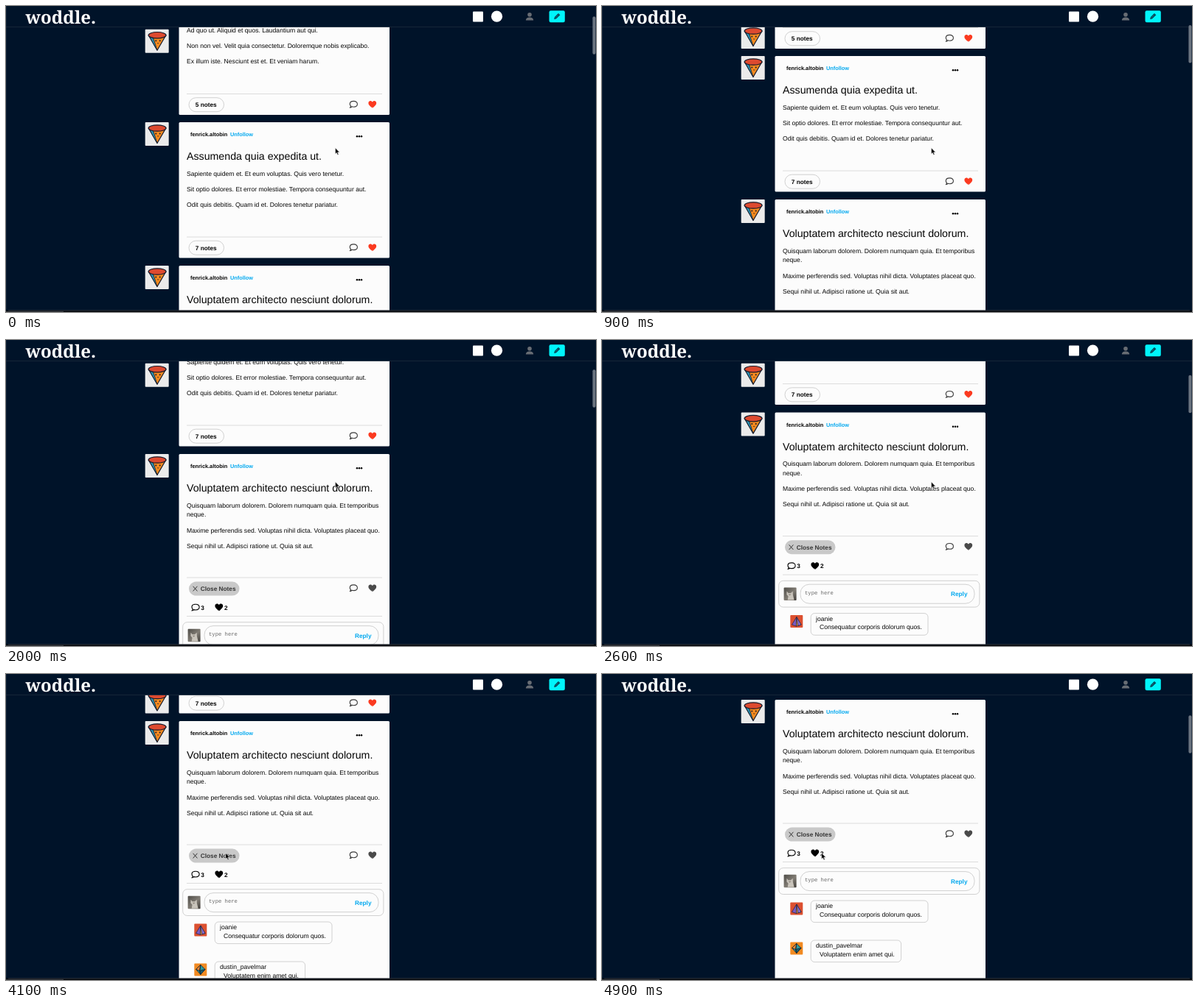
These frames come from a looping animation (800 by 416 pixels, 5 s). An HTML page:

```html
<!DOCTYPE html>
<html lang="en">
<head>
<meta charset="utf-8">
<title>Blog feed</title>
<style>
  html, body { margin: 0; width: 100%; height: 100%; overflow: hidden; background: #001329; }
  svg { display: block; width: 100vw; height: 100vh; }
  text { font-family: "Liberation Sans", Arial, sans-serif; font-size: 8.6px; fill: #050505; text-rendering: geometricPrecision; white-space: pre; }
  .logo { font: 900 24px "Noto Serif", serif; fill: #fff; }
  .title { font-size: 14.2px; }
  .user { font-size: 7.35px; font-weight: bold; }
  .pill { font-size: 8.25px; font-weight: bold; }
  .link { fill: #00a8ef; }
  .hint { font-family: "Liberation Mono", monospace; font-size: 7.2px; fill: #666; }
  .rule { stroke: #dcdcdc; stroke-width: 1; }
  .box { fill: #fcfcfc; stroke: #c6c6c6; stroke-width: .8; }
</style>
</head>
<body>
<svg id="stage" viewBox="0 0 800 416" preserveAspectRatio="none">
  <defs>
    <path id="heart" d="M0 5C-2-.0 0 5 -1 4.2C-4 1.6-5.4 .2-5.4-1.9C-5.4-3.7-4.1-4.9-2.6-4.9C-1.5-4.9-.6-4.3 0-3.4C.6-4.3 1.5-4.9 2.6-4.9C4.1-4.9 5.4-3.7 5.4-1.9C5.4 .2 4 1.6 1 4.2Z"/>
    <path id="bubble" fill="none" stroke-width="1.15" stroke-linejoin="round"
      d="M-3.5 2.5C-4.5 1.8-5-.1-5-.6C-5-2.9-2.8-4.4 .2-4.4S5.1-2.9 5.1-.5S3.2 3.4 .2 3.4C-.7 3.4-1.4 3.2-2 3C-2.8 3.8-3.9 4.3-5 4.3C-4.2 3.7-3.7 3.1-3.5 2.5Z"/>
    <g id="cone">
      <rect width="32" height="32" rx="1" fill="#ebebeb"/>
      <g stroke="#171b2b" stroke-linejoin="round" stroke-width="1.2">
        <path d="M4.6 8L16.3 28.5L28.2 8Z" fill="#f58a1f"/>
        <path d="M4.6 8L16.3 28.5L11 12Z" fill="#2b8fb0" stroke-width=".8"/>
        <ellipse cx="16.4" cy="8" rx="11.9" ry="4.2" fill="#dd4a30"/>
      </g>
      <circle cx="14.6" cy="15.5" r="1" fill="#171b2b"/>
      <circle cx="20" cy="15.5" r="1" fill="#171b2b"/>
      <path d="M16.4 18.7Q17.5 19.6 18.6 18.7" fill="none" stroke="#171b2b" stroke-width=".8"/>
    </g>
    <g id="pyramid">
      <rect width="17" height="17" rx="1" fill="#dc5030"/>
      <g stroke="#20203a" stroke-width=".7" stroke-linejoin="round">
        <path d="M8.5 2.5L2.2 13L8.2 15Z" fill="#7b5bc0"/>
        <path d="M8.5 2.5L8.2 15L14.8 13Z" fill="#e9a04a"/>
        <path d="M8.5 2.5L10.5 14.3L14.8 13Z" fill="#8a6fd0"/>
      </g>
    </g>
    <g id="octahedron">
      <rect width="17" height="17" rx="1" fill="#f18a22"/>
      <g stroke="#14202b" stroke-width=".8" stroke-linejoin="round">
        <path d="M8.5 2L2.3 8L8.5 15L14.7 8Z" fill="#2a9aa0"/>
        <path d="M8.5 2L2.3 8L7.3 10Z" fill="#e9883a"/>
        <path d="M8.5 15L7.3 10L14.7 8Z" fill="#1f5f70"/>
        <path d="M8.5 2L7.3 10L8.5 15" fill="none"/>
      </g>
    </g>
    <linearGradient id="fur" x2="1" y2="1">
      <stop stop-color="#4f4d48"/><stop offset=".55" stop-color="#817c74"/><stop offset="1" stop-color="#3e3b37"/>
    </linearGradient>
    <g id="pet">
      <rect width="17" height="17.5" rx="1" fill="url(#fur)"/>
      <path d="M4 5L6 7.5H9.5L12 5L12.3 10L14 17H5L6 12L3.8 9.5Z" fill="#c9c4bb"/>
      <path d="M6 9H10L8 11Z" fill="#8f877e"/>
    </g>
  </defs>
  <rect width="800" height="416" fill="#001329"/>
  <g id="feed"></g>
  <g id="header">
    <rect width="800" height="28.5" fill="#001329"/>
    <path d="M0 28.5H800" stroke="#1c2a3c" stroke-width=".8"/>
    <text class="logo" x="26.5" y="23.6">woddle.</text>
    <rect x="633" y="7.5" width="14" height="14" rx="1" fill="#fff"/>
    <circle cx="665.5" cy="14.2" r="7.6" fill="#fff"/>
    <g fill="#686d74">
      <circle cx="710" cy="11.7" r="2.8"/>
      <path d="M704.9 19.5C704.9 16.5 707 15.4 710 15.4S715.1 16.5 715.1 19.5Z"/>
    </g>
    <rect x="736.5" y="6.3" width="21.3" height="16" rx="2.2" fill="#00f5fb"/>
    <path d="M743.6 17.6L744.3 15L749 10.3L750.9 12.2L746.2 16.9ZM748 11.3L749.9 13.2" fill="#0a5d70" stroke="#06303f" stroke-width=".7"/>
  </g>
  <rect id="thumb" x="795.4" width="4" height="51.5" rx="2" fill="#6c7581"/>
  <rect y="413.7" width="800" height="2.3" fill="#05080d"/>
  <path d="M3 413.9H797" stroke="#4a5058" stroke-width=".6"/>
  <path d="M0 415.4H78" stroke="#3c4046" stroke-width="1"/>
  <path d="M.2 0V412" stroke="#29384a" stroke-width=".5"/>
  <path id="cursor" d="M0 0V8.4L1.9 6.7L3.2 9.7L4.7 9L3.4 6.1H6Z" fill="#050505" stroke="#fff" stroke-width=".6" stroke-linejoin="round"/>
</svg>
<script>
const LOOP = 5000, STEP = 100;
const $ = id => document.getElementById(id);

const text = (x, y, s, cls = "") => `<text class="${cls}" x="${x}" y="${y}">${s}</text>`;
const use = (id, x, y, attrs = "") => `<use href="#${id}" x="${x}" y="${y}" ${attrs}/>`;
const rule = y => `<path class="rule" d="M245 ${y}H510"/>`;
const box = (x, y, w, h, r) => `<rect class="box" x="${x}" y="${y}" width="${w}" height="${h}" rx="${r}"/>`;

function post({ height, title, lines, ruleY, liked }) {
  const dots = [476, 479, 482].map(x => `<circle cx="${x}" cy="19.2" r="1.25"/>`).join("");
  return `<rect x="234.5" width="285.5" height="${height}" rx="1.5" fill="#fcfcfc"/>`
    + text(250, 19, "fenrick.altobin", "user") + text(304, 19, "Unfollow", "user link")
    + dots + text(245, 51, title, "title")
    + lines.map(([y, s]) => text(245, y, s)).join("")
    + rule(ruleY)
    + use("bubble", 471.3, ruleY + 14.3, 'stroke="#3c3c3c"')
    + use("heart", 496.8, ruleY + 14.3, `fill="${liked ? "#fb3a20" : "#4a4a4a"}"`);
}

function likedPost(title, lines, count) {
  const rows = lines.map((s, i) => [72.5 + 21.1 * i, s]);
  return post({ height: 184.5, title, lines: rows, ruleY: 156, liked: true })
    + box(248, 161.2, 47.5, 19, 9.5) + text(256.8, 173.8, count + " notes", "pill");
}

function reply(y, avatar, width, name, words) {
  return use(avatar, 255.3, y + 2.5) + box(283.2, y, width, 29.6, 5)
    + text(290, y + 10, name) + text(295, y + 21.8, words);
}

function openPost() {
  return post({
    height: 600, ruleY: 168, title: "Voluptatem architecto nesciunt dolorum.",
    lines: [
      [72.5, "Quisquam laborum dolorem. Dolorem numquam quia. Et temporibus"],
      [85.3, "neque."],
      [106.5, "Maxime perferendis sed. Voluptas nihil dicta. Voluptates placeat quo."],
      [127.6, "Sequi nihil ut. Adipisci ratione ut. Quia sit aut."]
    ]
  })
    + `<rect x="248" y="173.6" width="68.5" height="19" rx="9.5" fill="#c9c9c9"/>`
    + `<path d="M253.6 179.8L259.4 186.4M259.4 179.8L253.6 186.4" stroke="#333" stroke-width="1"/>`
    + `<g fill-opacity=".75">${text(263.8, 186.2, "Close Notes", "pill")}</g>`
    + use("bubble", 257, 208.6, 'stroke="#050505"') + text(264.3, 211.6, "3", "pill")
    + use("heart", 288.8, 208.5) + text(296, 211.6, "2", "pill")
    + rule(220.5)
    + box(239.7, 228.7, 272.2, 35.8, 6) + use("pet", 246.6, 237.8)
    + box(269, 233.6, 236, 26, 12)
    + text(275, 247, "type here", "hint") + text(473, 249.6, "Reply", "pill link")
    + reply(273, "pyramid", 158.8, "joanie", "Consequatur corporis dolorum quos.")
    + reply(327, "octahedron", 122.4, "dustin_pavelmar", "Voluptatem enim amet qui.");
}

// Offsets are measured from the top of the last post.
const posts = [
  { offset: -389.5, height: 184.5, body: likedPost("", [
    "Ad quo ut. Aliquid et quos. Laudantium aut qui.",
    "Non non vel. Velit quia consectetur. Doloremque nobis explicabo.",
    "Ex illum iste. Nesciunt est et. Et veniam harum."], 5) },
  { offset: -195, height: 184.5, body: likedPost("Assumenda quia expedita ut.", [
    "Sapiente quidem et. Et eum voluptas. Quis vero tenetur.",
    "Sit optio dolores. Et error molestiae. Tempora consequuntur aut.",
    "Odit quis debitis. Quam id et. Dolores tenetur pariatur."], 7) },
  { offset: 0, height: 600, body: openPost() }
];
$("feed").innerHTML = posts.map(p => `<g>${p.body}</g>` + use("cone", 188.7, 0)).join("");
posts.forEach((p, i) => {
  p.card = $("feed").children[2 * i];
  p.avatar = $("feed").children[2 * i + 1];
});

// Monotone cubic through [time, value] keys, flat at both ends.
function curve(keys) {
  const rate = keys.slice(1).map(([t, v], i) => (v - keys[i][1]) / (t - keys[i][0]));
  const slope = keys.map((_, i) => {
    const a = rate[i - 1], b = rate[i];
    return a * b > 0 ? 2 * a * b / (a + b) : 0;
  });
  return t => {
    let i = 0;
    while (i < keys.length - 2 && t > keys[i + 1][0]) i++;
    const [t0, v0] = keys[i], [t1, v1] = keys[i + 1];
    const d = t1 - t0, u = Math.min(1, Math.max(0, (t - t0) / d)), w = 1 - u;
    return v0 * w * w * (1 + 2 * u) + v1 * u * u * (1 + 2 * w)
      + d * u * w * (slope[i] * w - slope[i + 1] * u);
  };
}

const scroll = curve([[0, 353], [900, 263], [1400, 226], [2000, 155], [2600, 98.6], [3200, 64], [4200, 64], [4800, 36], [4900, 35]]);
const travel = curve([[3300, 0], [4000, 1]]);
const fade = curve([[3600, 1], [3900, 0], [4200, 0], [4300, 1]]);

function draw(time) {
  const t = Math.floor(time % LOOP / STEP) * STEP;
  const top = scroll(t), k = travel(t);
  for (const { offset, height, card, avatar } of posts) {
    const y = top + offset;
    card.setAttribute("transform", `translate(0 ${y})`);
    avatar.setAttribute("y", Math.min(Math.max(y, 31.7), y + height - 32));
  }
  $("thumb").setAttribute("y", 14.2 + (353 - top) * 0.132);
  $("thumb").setAttribute("opacity", fade(t));
  $("cursor").setAttribute("transform", `translate(${446.4 - 148.8 * k} ${192.8 + 50.4 * k})`);
}

let start;
function tick(now) {
  start ??= now;
  draw(now - start);
  requestAnimationFrame(tick);
}
draw(0);
requestAnimationFrame(tick);
</script>
</body>
</html>
```
